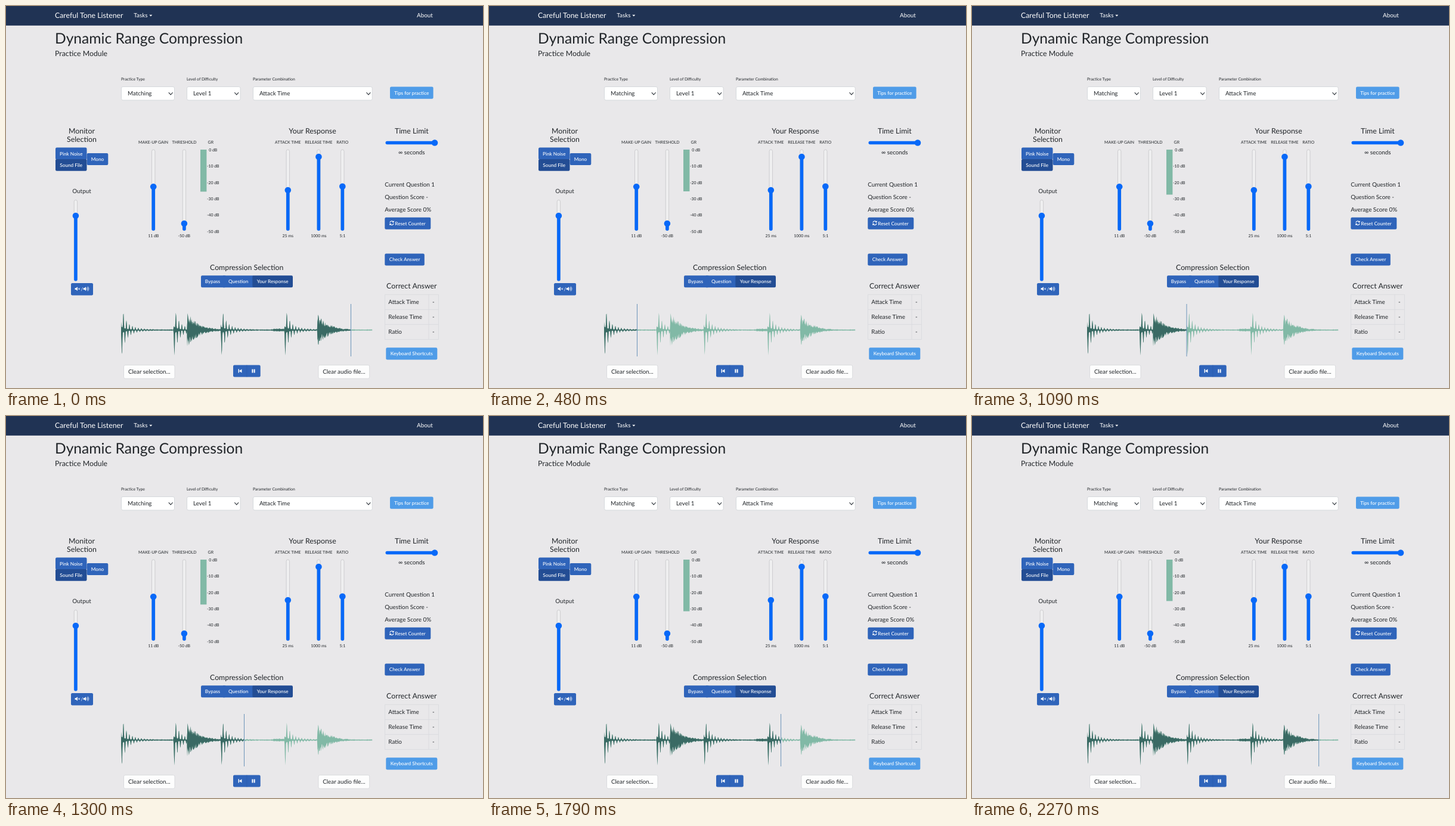
Write an HTML page that moves like this. It is 800x641 px and loops after 2300 ms.

```html
<!DOCTYPE html>
<html lang="en">
<head>
<meta charset="utf-8">
<title>Dynamic Range Compression</title>
<style>
html, body { margin: 0; width: 100%; height: 100%; overflow: hidden; background: #e9e8ea; }
svg { display: block; width: 800px; height: 641px; font-family: Lato, sans-serif; text-rendering: geometricPrecision; }
</style>
</head>
<body>
<svg id="stage" viewBox="0 0 800 641"></svg>
<script>
const INK = '#212529', BLUE = '#2f64ba', ACTIVE = '#234d94', SKY = '#4f9ce8',
  SLIDE = '#0869f8', MINT = '#81b9a6', PINE = '#3a6a64';
const BODY = 9.85, HEAD = 12.32, TITLE = 24.64, SMALL = 6.9, BTN = 8.2;
const out = [];

const rect = (x, y, w, h, fill, extra = '') =>
  out.push(`<rect x="${x}" y="${y}" width="${w}" height="${h}" fill="${fill}" ${extra}/>`);
const path = (d, extra) => out.push(`<path d="${d}" ${extra}/>`);
const text = (x, y, str, size = BODY, anchor = 'start', fill = INK, weight = 400) =>
  out.push(`<text x="${x}" y="${y}" font-size="${size}" text-anchor="${anchor}" fill="${fill}" font-weight="${weight}">${str}</text>`);
const mid = (x, y, str, size) => text(x, y, str, size, 'middle');

function button(x, y, w, h, label, fill = BLUE) {
  rect(x, y, w, h, fill, 'rx="2.2"');
  if (label) text(x + w / 2, y + h / 2 + 2.9, label, BTN, 'middle', '#fff', 500);
}

function select(x, w, title, value) {
  text(x, 125.3, title, 6.8);
  rect(x + .5, 135.5, w - 1, 22.5, '#fff', 'rx="2.5" stroke="#cfd2d6" stroke-width=".8"');
  text(x + 11, 150.3, value);
  path(`M${x + w - 10.2} 145.2l3.4 3.6l3.4-3.6`, 'fill="none" stroke="#343a40" stroke-width="1.2"');
}

function slider(x, top, knob) {
  rect(x - 2.7, top, 5.4, 136, '#efeff0', 'rx="2.7" stroke="#c6c6c8" stroke-width=".8"');
  rect(x - 2.8, knob, 5.6, top + 136 - knob, SLIDE, 'rx="2.7"');
  out.push(`<circle cx="${x}" cy="${knob}" r="5.3" fill="${SLIDE}"/>`);
}

// navigation and titles
rect(0, 0, 800, 32.8, '#203354');
text(82, 20, 'Careful Tone Listener', HEAD, 'start', '#fff');
text(214.3, 19, 'Tasks', BODY, 'start', '#fff');
path('M240.3 14.8h5l-2.5 2.7z', 'fill="#fff"');
text(689, 19, 'About', BODY, 'start', '#fff');
text(82, 62.5, 'Dynamic Range Compression', TITLE);
text(82, 84.3, 'Practice Module', HEAD);

select(193, 90, 'Practice Type', 'Matching');
select(303, 90.5, 'Level of Difficulty', 'Level 1');
select(414, 200.7, 'Parameter Combination', 'Attack Time');
button(644, 135.5, 72.6, 20.3, 'Tips for practice', SKY);

// monitor column
mid(127, 214.4, 'Monitor', HEAD);
mid(127, 228, 'Selection', HEAD);
button(83, 237.5, 52.5, 20.3, 'Pink Noise');
button(83, 257, 52.5, 19.8, 'Sound File', ACTIVE);
button(135.7, 247, 35.6, 20, 'Mono');
mid(127, 314.4, 'Output', BODY);
slider(116.9, 325.5, 352);
button(109, 465, 37, 20.4);
const speaker = x => path(`M${x} 473.3h1.9l2.4-2.1v6.8l-2.4-2.1h-1.9z`, 'fill="#fff"');
speaker(115.6);
path('M121.2 473.2l2.8 2.8m0-2.8l-2.8 2.8', 'stroke="#fff" stroke-width="1"');
text(127.3, 477.7, '/', BTN, 'middle', '#fff');
speaker(129.7);
path('M135 473.3q1.3 1.3 0 2.6m1-4q2.6 2.7 0 5.4m1.1-6.6q3.6 3.9 0 7.8', 'fill="none" stroke="#fff" stroke-width=".8"');

// compressor parameters
mid(247, 231, 'MAKE-UP GAIN', SMALL);
mid(299, 231, 'THRESHOLD', SMALL);
mid(343.3, 231, 'GR', SMALL);
for (let i = 0; i < 6; i++)
  mid(347.3, 243.7 + i * 27.4, (i ? -10 * i : 0) + ' dB', SMALL);
slider(247.2, 241, 303.2);
slider(298.9, 241, 365);
mid(247.2, 388, '11 dB', SMALL);
mid(298.8, 388, '-50 dB', SMALL);
mid(514, 214.4, 'Your Response', HEAD);
[[472.8, 'ATTACK TIME', 309, '25 ms'], [524.4, 'RELEASE TIME', 253, '1000 ms'], [564.3, 'RATIO', 302.8, '5:1']]
  .forEach(([x, name, knob, value]) => {
    mid(x, 231, name, SMALL);
    slider(x, 241, knob);
    mid(x, 388, value, SMALL);
  });

// right column
mid(680.3, 214.4, 'Time Limit', HEAD);
rect(636.5, 226.8, 85, 5.4, SLIDE, 'rx="2.7"');
out.push(`<circle cx="719" cy="229.5" r="5.3" fill="${SLIDE}"/>`);
mid(680.3, 248.6, '∞ seconds', BODY);
text(635.3, 303.4, 'Current Question 1');
text(635.3, 324, 'Question Score -');
text(635.3, 344.6, 'Average Score 0%');
button(635.3, 354.7, 77, 20);
text(652.3, 367.6, 'Reset Counter', BTN, 'start', '#fff', 500);
path('M643.8 363.6a3.2 3.2 0 0 1 5.7-1.4m.6 2.6a3.2 3.2 0 0 1-5.7 1.4', 'fill="none" stroke="#fff" stroke-width="1.1"');
path('M650.6 360.2v3.1h-3.1zM643.3 368.2v-3.1h3.1z', 'fill="#fff"');
button(635.3, 415.5, 66.5, 20, 'Check Answer');
mid(680.3, 474.4, 'Correct Answer', HEAD);
['Attack Time', 'Release Time', 'Ratio'].forEach((name, i) => {
  text(641.3, 500.4 + i * 25, name);
  mid(716.8, 500.4 + i * 25, '-', BODY);
});
path('M635.5 484.3h90v75.2h-90zM635.5 509.4h90m-90 25h90M709 484.3v75.2',
  'fill="none" stroke="#d9dadd" stroke-width=".8"');
button(637.3, 573.3, 86, 20.2, 'Keyboard Shortcuts', SKY);

// playback controls
mid(403.7, 443, 'Compression Selection', HEAD);
button(327, 452.3, 42, 20);
rect(364, 452.3, 51, 20, BLUE);
button(413.3, 452.3, 67.7, 20, 'Your Response', ACTIVE);
text(346.5, 465.2, 'Bypass', BTN, 'middle', '#fff', 500);
text(389.7, 465.2, 'Question', BTN, 'middle', '#fff', 500);
[[197.5, 85.5, 'Clear selection...'], [524, 85.7, 'Clear audio file...']].forEach(([x, w, label]) => {
  rect(x, 602.6, w, 22.6, '#fdfdfd', 'rx="2.5" stroke="#d3d5d9" stroke-width=".8"');
  mid(x + w / 2, 617.4, label, BODY);
});
button(381, 602.5, 45.7, 20);
path('M403.9 602.5v20', 'stroke="#2859a8" stroke-width=".6"');
path('M389.6 609.2h1.4v6.4h-1.4zM395.4 609.2v6.4l-4.4-3.2zM412.4 609.4h2v6h-2zM415.6 609.4h2v6h-2z', 'fill="#fff"');

// waveform: decaying drum hits around the centre line
const LEFT = 193, RIGHT = 614.5, AXIS = 543.7;
const kicks = [193, 281, 360.3, 467], snares = [[304, 31], [522, 28]];
const noise = n => { const v = Math.sin(n * 12.9898) * 43758.5453; return v - Math.floor(v); };

function extent(x, n, sign) {
  let a = .5 + .6 * noise(n + 7);
  for (const k of kicks) {
    const d = x - k;
    if (d < 0 || d > 88) continue;
    const swing = Math.max(0, sign * Math.cos((d - 4) / 5 * 2 * Math.PI)) ** 1.5;
    const fall = .78 * Math.exp(-d / 6) + .22 * Math.exp(-d / 26);
    a = Math.max(a, (sign > 0 ? 50 : 52) * fall * (.12 + .88 * swing));
  }
  for (const [k, amp] of snares) {
    const d = x - k;
    if (d >= 0 && d < 92) a = Math.max(a, amp * Math.exp(-d / 19) * (.35 + .65 * noise(n + (sign > 0 ? 0 : 900))));
  }
  if (x > 448 && x < 467) a = Math.max(a, 1 + 1.6 * noise(n + 300));
  return a;
}

const upper = [], lower = [];
for (let x = LEFT, n = 0; x <= RIGHT; x += .6, n++) {
  upper.push(`${x.toFixed(1)} ${(AXIS - extent(x, n, 1)).toFixed(1)}`);
  lower.unshift(`${x.toFixed(1)} ${(AXIS + extent(x, n, -1)).toFixed(1)}`);
}
const wave = 'M' + upper.concat(lower).join('L') + 'z';
out.push('<clipPath id="past"><rect id="played" x="190" y="495" width="0" height="100"/></clipPath>');
path(wave, `fill="${MINT}"`);
path(wave, `fill="${PINE}" clip-path="url(#past)"`);
rect(0, 500, 1, 88, '#6b93b9', 'id="cursor"');
rect(326, 241, 10.4, 0, MINT, 'id="gain"');
rect(124, 462, 10, 0, MINT, 'id="level"');

document.getElementById('stage').innerHTML = out.join('');

const LOOP = 2300, TICK = 1000 / 33;
const head = [[0, 578.5], [182, 614], [182, 193], [485, 248.5], [818, 310.5], [1091, 360],
  [1515, 439], [2030, 534.5], [2272, 581.5], [2300, 587]];
const gain = [[0, 70.5], [182, 58], [215, 95], [485, 70], [660, 57], [690, 93], [785, 85],
  [815, 98.3], [1091, 75.5], [1125, 92], [1515, 55.5], [1668, 45], [1700, 94], [1962, 72],
  [1995, 98], [2030, 94.5], [2272, 69.5], [2300, 68]];
const hits = [182, 660, 785, 1093, 1668, 1962];

function at(table, t) {
  let i = 1;
  while (i < table.length - 1 && table[i][0] <= t) i++;
  const [t0, a] = table[i - 1], [t1, b] = table[i];
  return a + (b - a) * (t - t0) / (t1 - t0);
}

const el = id => document.getElementById(id);
const cursor = el('cursor'), played = el('played'), gainBar = el('gain'), levelBar = el('level');
const start = performance.now();

function draw() {
  const now = (performance.now() - start) % LOOP;
  const t = Math.min(75, Math.floor((now + 5) / TICK)) * TICK;
  const x = at(head, t);
  cursor.setAttribute('x', x - .5);
  played.setAttribute('width', x - 190);
  gainBar.setAttribute('height', at(gain, t));
  const level = Math.max(0, ...hits.map(h => t < h ? 0 : 69 - .82 * (t - h)));
  levelBar.setAttribute('y', 462 - level);
  levelBar.setAttribute('height', level);
  requestAnimationFrame(draw);
}
draw();
</script>
</body>
</html>
```
